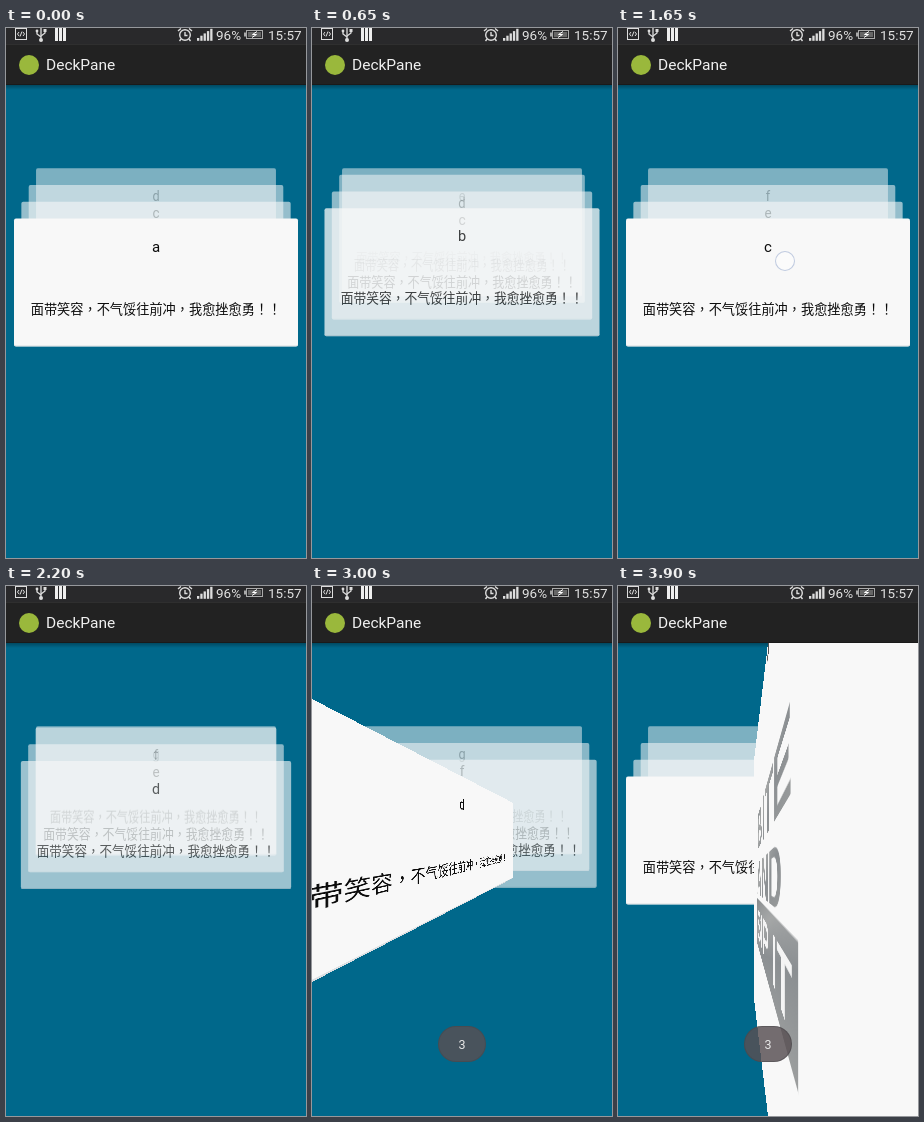
Recreate the animation shown at these times as an HTML page with a canvas. Size 300x530 px, loop 3.95 s.

```html
<!DOCTYPE html>
<html lang="zh-Hant">
<head>
<meta charset="utf-8">
<title>Card stack</title>
<style>
html, body { margin: 0; width: 100%; height: 100%; overflow: hidden; background: #00688b; }
#stage { position: relative; width: 300px; height: 530px; overflow: hidden; font-family: Roboto, sans-serif; }
#stage div { position: absolute; }
#top { left: 0; top: 0; width: 300px; height: 57px; color: #e2e2e2; white-space: nowrap; }
#icons { position: absolute; left: 0; top: 0; }
#top div { line-height: 16px; font-size: 13.5px; top: -1px; }
#top .title { left: 40px; top: 28px; line-height: 18px; font-size: 15.5px; color: #f0f0f0; }
#deck { left: 0; top: 57px; width: 300px; height: 473px; overflow: hidden; }
#shade { left: 0; top: 0; width: 300px; height: 5px; background: linear-gradient(rgba(0, 0, 0, .3), transparent); }
.card {
  left: 8px; top: 0; width: 284px; height: 128px; border-radius: 2px;
  background: #f8f8f8; box-shadow: inset 0 -1px #dcdfe2;
  color: #0c0c0c; text-align: center; white-space: nowrap;
}
.card div { left: 0; width: 100%; line-height: 20px; }
.card .label { top: 18px; font-size: 15px; }
.card .line { top: 80px; font: 13.2px/20px "Noto Sans CJK TC", "Noto Sans CJK", sans-serif; }
#page { left: 0; top: 0; width: 300px; height: 473px; background: #f8f8f8; z-index: 20; }
#page div { left: 0; top: 0; width: 100%; line-height: 20px; font-size: 15px; text-align: center; color: #111; }
#page svg { position: absolute; left: 0; top: 0; }
#touch {
  left: -10px; top: -10px; width: 18px; height: 18px; border-radius: 50%; z-index: 30;
  background: rgba(255, 255, 255, .4); border: 1px solid rgba(120, 145, 190, .45);
}
#toast {
  left: 126px; top: 440px; width: 46px; height: 34px; border-radius: 18px; z-index: 30;
  background: rgba(88, 80, 83, .83); border: 1px solid rgba(70, 68, 72, .5);
  color: #e8e8e8; font-size: 12.5px; line-height: 35px; text-align: center;
}
</style>
</head>
<body>
<div id="stage">
  <div id="deck">
    <div id="shade"></div>
    <div id="page">
      <div>d</div>
      <svg width="300" height="473" viewBox="-150 -236.5 300 473" font-family="'Liberation Sans', Arial, sans-serif" font-weight="bold">
        <defs>
          <linearGradient id="stone" x2="1" y2="1">
            <stop offset="0" stop-color="#85898b"/>
            <stop offset=".35" stop-color="#a5a7a7"/>
            <stop offset=".6" stop-color="#8b8f92"/>
            <stop offset="1" stop-color="#9c9e9e"/>
          </linearGradient>
        </defs>
        <g fill="url(#stone)">
          <text x="-98" y="-48" font-size="76">BITE</text>
          <text x="-98" y="22" font-size="70">AND</text>
          <rect x="-101" y="30" width="185" height="73"/>
        </g>
        <text x="-96" y="89" font-size="62" fill="#f4f4f4">SIP IT</text>
      </svg>
    </div>
  </div>
  <div id="top">
    <canvas id="icons" width="300" height="57"></canvas>
    <div style="left:210px">96%</div>
    <div style="left:262px">15:57</div>
    <div class="title">DeckPane</div>
  </div>
  <div id="touch"></div>
  <div id="toast">3</div>
</div>
<script>
const LOOP = 3950, BAR = 57, FRONT_Y = 190.5, STEP_Y = 16.75, WIDTH = 284, STEP_W = 14.7;
const EXIT_MS = 235, SHIFT_MS = 220;
const OPEN = { at: 2700, ms: 831 }, CLOSE = { at: 3757, ms: 310 };
const OPENED = 3; // index of the card that flips

// One swipe per card: touch down, slide out, stack moves forward
const swipes = [
  { down: 240, exit: 340, shift: 565, x: 150, y: 230 },
  { down: 945, exit: 1045, shift: 1230, x: 148, y: 232 },
  { down: 1640, exit: 1995, shift: 2186, x: 167, y: 233 }
];

const $ = id => document.getElementById(id);
const part = (t, from, ms) => Math.min(1, Math.max(0, (t - from) / ms));
const ease = p => (1 - Math.cos(Math.PI * p)) / 2;
const turn = (t, flip) => 180 * ease(part(t, flip.at, flip.ms));
const spin = deg => `perspective(160px) rotateY(${deg}deg)`;
const show = (el, on) => { el.style.visibility = on ? "visible" : "hidden"; };

function addDiv(parent, cls, text) {
  const el = document.createElement("div");
  el.className = cls;
  el.textContent = text;
  parent.appendChild(el);
  return el;
}

const cards = [..."abcdefg"].map((letter, i) => {
  const el = addDiv($("deck"), "card", "");
  addDiv(el, "label", letter);
  addDiv(el, "line", "面带笑容，不气馁往前冲，我愈挫愈勇！！");
  el.style.zIndex = 10 - i;
  return el;
});

const slotAlpha = q => q <= 1 ? 1 - 0.4 * q : 0.6 - 0.05 * (q - 1);

function placeCard(el, i, t, shifted) {
  const swipe = swipes[i];
  const q = i - shifted;
  if (q >= 4 || (swipe && t >= swipe.shift)) return show(el, false);
  show(el, true);
  const out = swipe ? part(t, swipe.exit, EXIT_MS) : 0;
  const slot = Math.min(q, 3);
  const y = FRONT_Y - BAR - STEP_Y * slot + 128 * out;
  const scale = (WIDTH - STEP_W * slot + 15 * out) / WIDTH;
  el.style.opacity = out ? 1 - out : slotAlpha(slot);
  el.style.transform = `translateY(${y}px) scaleX(${scale})`;
}

function placeFlip(t) {
  const card = cards[OPENED], page = $("page");
  const opening = turn(t, OPEN), closing = turn(t, CLOSE);
  const opened = t >= OPEN.at + OPEN.ms;
  if (opening > 0 && !opened) {
    show(card, opening < 90);
    card.style.transform = `translateY(${FRONT_Y - BAR}px) ${spin(opening)}`;
  }
  show(page, opening >= 90 && closing < 90);
  page.style.transform = spin(opened ? -closing : opening - 180);
}

function placeTouch(t) {
  const s = swipes.find(s => t >= s.down && t < s.shift);
  show($("touch"), !!s);
  if (!s) return;
  const p = part(t, s.exit, EXIT_MS);
  $("touch").style.transform = `translate(${s.x - 5 * p}px, ${s.y + 95 * p}px)`;
}

function render(t) {
  const shifted = swipes.reduce((sum, s) => sum + part(t, s.shift, SHIFT_MS), 0);
  cards.forEach((el, i) => placeCard(el, i, t, shifted));
  placeFlip(t);
  placeTouch(t);
  $("toast").style.opacity = part(t, 2720, 130);
}

function drawBars() {
  const c = $("icons").getContext("2d");
  const box = (color, x, y, w, h) => { c.fillStyle = color; c.fillRect(x, y, w, h); };
  const line = (...p) => {
    c.beginPath();
    for (let i = 0; i < p.length; i += 2) c.lineTo(p[i], p[i + 1]);
    c.stroke();
  };
  const disc = (x, y, r) => { c.beginPath(); c.arc(x, y, r, 0, 7); };

  box("#29292b", 0, 0, 300, 16);
  box("#222", 0, 16, 300, 41);
  box("#2f2f2f", 0, 16, 300, 1);
  box("#1a1a1a", 0, 56, 300, 1);
  c.fillStyle = "#9ab83c";
  disc(23, 37, 10);
  c.fill();

  c.strokeStyle = "#ddd";
  c.lineWidth = 1;
  // code box
  c.strokeRect(9.5, 0.5, 11, 11);
  line(13, 4, 11.5, 6, 13, 8);
  line(17, 4, 18.5, 6, 17, 8);
  line(16, 3.5, 14, 8.5);
  // cable fork
  c.lineWidth = 1.3;
  line(35, 0, 35, 12);
  line(31, 3, 31, 6, 35, 9);
  line(39, 2, 39, 5, 35, 8);
  c.fillStyle = "#ddd";
  disc(35, 12, 2); c.fill();
  disc(31, 3, 1.4); c.fill();
  box("#ddd", 37.5, 1, 3, 3);
  // three blocks
  for (let i = 0; i < 3; i++) box("#eee", 49 + 4 * i, 0, 3, 13);
  // alarm clock
  c.lineWidth = 1.4;
  disc(179, 7, 5.3); c.stroke();
  line(179, 4, 179, 7.5, 181.5, 7.5);
  line(172, 3, 175, 0.5);
  line(183, 0.5, 186, 3);
  line(175, 11, 173.5, 13);
  line(183, 11, 184.5, 13);
  // signal
  for (let i = 0; i < 5; i++) box("#ddd", 191 + 3.3 * i, 10 - 2.3 * i, 2.3, 2.8 + 2.3 * i);
  // battery
  c.lineWidth = 1;
  c.strokeStyle = "#aaa";
  c.strokeRect(240.5, 2.5, 16, 8);
  box("#aaa", 238, 4.5, 2, 4);
  box("#666", 242, 4, 13, 5);
  c.strokeStyle = "#fff";
  line(251, 3.5, 246.5, 6.5, 250.5, 6.5, 246, 9.5);
}

drawBars();
const start = performance.now();
function tick() {
  render((performance.now() - start) % LOOP);
  requestAnimationFrame(tick);
}
tick();
</script>
</body>
</html>
```
